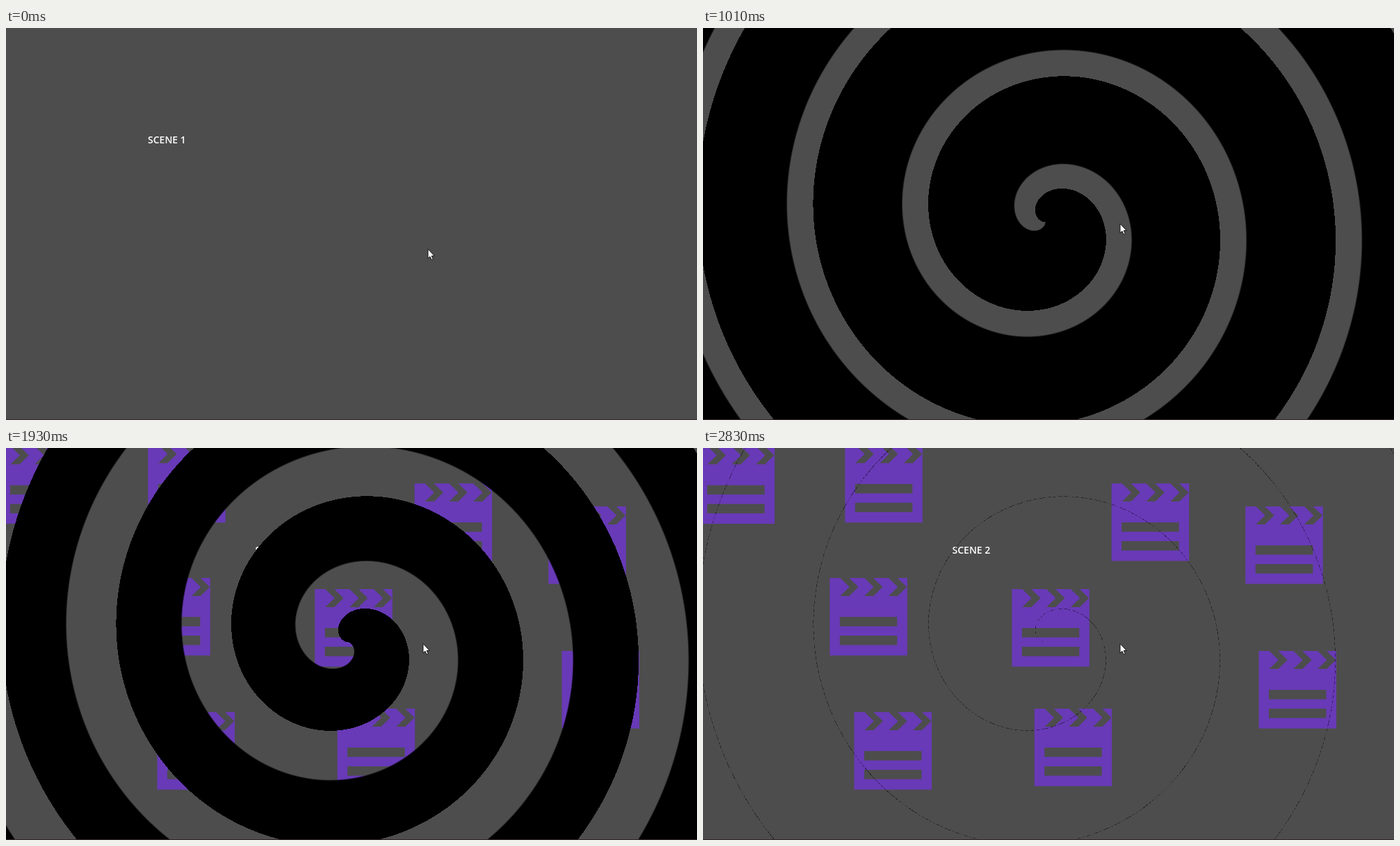
Recreate the animation shown at these times as an HTML page with a canvas. Size 994 by 564 pixels, loop 3.44 s.

```html
<!DOCTYPE html>
<html lang="en">
<head>
<meta charset="utf-8">
<title>Spiral scene transition</title>
<style>
  html, body { margin: 0; width: 100%; height: 100%; overflow: hidden; background: #4d4d4d; }
  svg, canvas { position: absolute; left: 0; top: 0; display: block; }
  text { font: 600 14px "Open Sans", "Noto Sans", sans-serif; fill: #fff; }
</style>
</head>
<body>
<svg width="994" height="564">
  <defs>
    <path id="chevron" d="M15 0h13l13.3 13-13.3 13h-13l13.3-13z"/>
    <g id="clapper">
      <path fill="#683ab7" d="M0 0h111.5v111.5H0z"/>
      <g fill="#4d4d4d">
        <use href="#chevron"/>
        <use href="#chevron" x="34.8"/>
        <use href="#chevron" x="69.6"/>
        <path d="M14.5 56h82.5v13.5H14.5zM14.5 83h82.5v13.5H14.5z"/>
      </g>
    </g>
  </defs>
  <g id="first"><text x="204" y="166">SCENE 1</text></g>
  <g id="second"><g id="icons"></g><text x="358.5" y="152">SCENE 2</text></g>
</svg>
<canvas id="mask" width="994" height="563"></canvas>
<svg width="994" height="564">
  <path fill="#35252d" d="M0 563h994v1H0z"/>
  <path id="cursor" fill="#fff" stroke="#111" stroke-width="1" d="M0 0v13.5l3-2.7 2.1 4.7 2.2-1-2.1-4.5h4.1z"/>
</svg>
<script>
const LOOP = 3440, SWAP = 1250, END = 2830;
const W = 994, H = 563, CX = 492.7, CY = 279.2, PITCH = 166.6;
const $ = id => document.getElementById(id);

const spots = [[-8.5, -2.5], [204.3, -4.3], [587.7, 51], [780.3, 84], [182.3, 187],
  [444.3, 203], [217.5, 380], [476.7, 375], [799.5, 292]];
$('icons').innerHTML = spots.map(([x, y]) => `<use href="#clapper" x="${x}" y="${y}"/>`).join('');

// Distance inward from the spiral edge, as a share of one turn
const ctx = $('mask').getContext('2d');
const img = ctx.createImageData(W, H);
const depth = new Float32Array(W * H);
for (let y = 0, i = 0; y < H; y++) {
  for (let x = 0; x < W; x++, i++) {
    const dx = x + .5 - CX, dy = y + .5 - CY;
    const v = Math.atan2(dy, dx) / (2 * Math.PI) + .5 - Math.hypot(dx, dy) / PITCH;
    depth[i] = v - Math.floor(v);
  }
}

// Start and length of the ticks from that time on
const ticks = [[0, 280], [280, 77], [510, 90], [600, 67], [800, 70], [1360, 80],
  [1440, 70], [2490, 60], [2550, 70]];
function snap(t) {
  if (t >= END) return END;
  const [start, len] = ticks.filter(k => k[0] <= t).pop();
  return start + Math.floor((t - start) / len) * len;
}

function cover(t) {
  if (t < 280) return -1;
  return t < SWAP ? 1 - (SWAP - t) * .000948 : Math.max(0, (2811 - t) / 1553);
}

function drawMask(p) {
  const px = img.data;
  for (let i = 0; i < depth.length; i++) {
    let a = 0;
    if (p > 0) {
      // hard outer edge, slightly soft moving edge
      a = Math.min(1, Math.max(0, (p - depth[i]) * PITCH / 2 + .5));
    } else if (p === 0 && depth[i] * PITCH < .9) {
      // broken hairline left along the edge
      const x = i % W, y = (i - x) / W;
      a = (x ^ y) & 4 ? .5 : .1;
    }
    px[i * 4 + 3] = a * 255;
  }
  ctx.putImageData(img, 0, 0);
}

let last = -1;
function frame(now) {
  const t = snap(now % LOOP);
  if (t !== last) {
    last = t;
    drawMask(cover(t));
    $('first').style.display = t < SWAP ? '' : 'none';
    $('second').style.display = t < SWAP ? 'none' : '';
    const m = Math.min(1, Math.max(0, (t - 650) / 200));
    $('cursor').setAttribute('transform', `translate(${607 - 7 * m} ${318 - 36.5 * m})`);
  }
  requestAnimationFrame(frame);
}
frame(performance.now());
</script>
</body>
</html>
```
